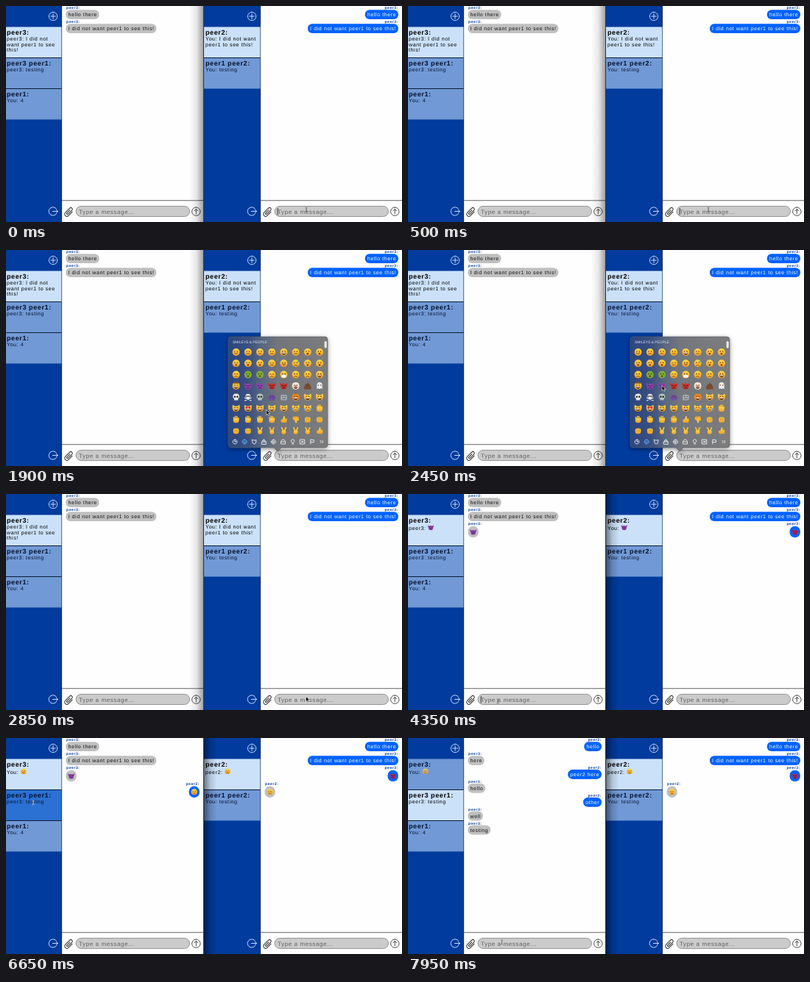
Animation of 538x294 px, one loop 8 s. Source, as an HTML page:

```html
<!DOCTYPE html>
<html lang="en">
<head>
<meta charset="utf-8">
<title>Two chat windows</title>
<style>
html, body { margin: 0; width: 100%; height: 100%; overflow: hidden; background: #fff; }
svg { display: block; width: 100vw; height: 100vh; }
text { font-family: "Liberation Sans", Arial, sans-serif; letter-spacing: .6px; text-rendering: geometricPrecision; white-space: pre; }
.title { font-size: 9px; font-weight: bold; }
.sub, .msg { font-size: 7px; }
.name { font-size: 5px; font-weight: bold; fill: #003a9a; }
.hint { font-size: 8px; fill: #606060; }
.head { font-size: 4.9px; letter-spacing: 0; fill: #e3e8f0; }
.line { fill: none; stroke-linecap: round; stroke-linejoin: round; }
</style>
</head>
<body>
<svg id="stage" viewBox="0 0 538 294" preserveAspectRatio="none"></svg>
<script>
const LOOP = 8000;
const A = 'peer1', B = 'peer2', C = 'peer3';
const SECRET = `I did not want ${A} to see this!`;

// Moments of the story, in ms
const T = {
  open: 600, close: 2450, typed: 3000, sent: 3450,
  swap: 4250, open2: 4700, close2: 5550, sent2: 6000,
  hover: 6400, group: 6900
};

const pen = document.createElement('canvas').getContext('2d');
pen.font = '7px "Liberation Sans", Arial, sans-serif';
const textWidth = s => pen.measureText(s).width + s.length * .6;

const at = (x, y, body, scale = 1) => `<g transform="translate(${x} ${y}) scale(${scale})">${body}</g>`;
const rect = (x, y, w, h, fill, rx = 0) => `<rect x="${x}" y="${y}" width="${w}" height="${h}" rx="${rx}" fill="${fill}"/>`;
const disc = (x, y, r, fill) => `<circle cx="${x}" cy="${y}" r="${r}" fill="${fill}"/>`;
const shape = (d, fill) => `<path d="${d}" fill="${fill}"/>`;
const stroke = (d, color, w = 1) => `<path class="line" d="${d}" stroke="${color}" stroke-width="${w}"/>`;
const text = (cls, x, y, s, extra = '') => `<text class="${cls}" x="${x}" y="${y}" ${extra}>${s.replace('&', '&amp;')}</text>`;
const during = (from, to, body) => `<g data-from="${from}" data-to="${to}">${body}</g>`;

// ---- Emoji -------------------------------------------------------------
const INK = '#6b3a10';
const eyes = {
  dot: disc(-1.8, -1, .8, INK) + disc(1.8, -1, .8, INK),
  arc: stroke('M-2.9-.6q1-1.3 2 0M.9-.6q1-1.3 2 0', INK, .8),
  heart: disc(-2, -1.2, 1.6, '#e2283a') + disc(2, -1.2, 1.6, '#e2283a'),
  shade: rect(-4.2, -2.2, 3.8, 2.6, '#222', 1) + rect(.4, -2.2, 3.8, 2.6, '#222', 1)
};
const mouths = {
  grin: shape('M-3 .8h6q-.4 3.2-3 3.2t-3-3.2z', INK) + rect(-2.4, .8, 4.8, 1, '#fff'),
  smile: stroke('M-2.4 1.4q2.4 2.2 4.8 0', INK, .8),
  frown: stroke('M-2 3q2-1.8 4 0', INK, .8),
  flat: stroke('M-1.9 2.2h3.8', INK, .8),
  oh: disc(0, 2.3, 1.3, INK),
  kiss: disc(.3, 2, .7, INK) + disc(3.4, 2.6, 1.3, '#e2283a'),
  tongue: stroke('M-2.4 1h4.8', INK, .8) + rect(-1.2, 1, 2.4, 2.8, '#e8506a', 1.1),
  mask: rect(-3.4, .4, 6.8, 3.8, '#eef3f7', 1.4)
};
const extras = {
  sweat: disc(3.6, -2.6, 1.2, '#4aa8ee'),
  tears: disc(-3.8, 1.2, 1.2, '#4aa8ee') + disc(3.8, 1.2, 1.2, '#4aa8ee'),
  halo: '<ellipse cy="-4.4" rx="3.4" ry="1.1" fill="none" stroke="#4ab4ee"/>',
  hat: shape('M-5.4-2.4q5.4-2 10.8 0l-2-.8-1-2.4h-4.8l-1 2.4z', '#8a5422')
};
const face = (eye, mouth, extra, skin = 'url(#sun)') =>
  disc(0, 0, 5.2, skin) + eyes[eye] + mouths[mouth] + (extras[extra] || '');
const imp = (skin, ink = '#3d124e') =>
  shape('M-5-5q.4 2.4 2 2.6q3-1.6 6 0q1.6-.2 2-2.6q1.2 3-.6 5.2q.4 4.9-4.4 4.9t-4.4-4.9q-1.8-2.2-.6-5.2z', skin) +
  stroke('M-3-.8l2 1M3-.8l-2 1M-1.8 3.2q1.8-1.6 3.6 0', ink, .9);
const skull = skin => shape('M0-5q4.6 0 4.6 4.4q0 2-1.8 2.8v2.4h-5.6v-2.4q-1.8-.8-1.8-2.8q0-4.4 4.6-4.4z', skin) +
  disc(-1.8, -.4, 1.3, '#222') + disc(1.8, -.4, 1.3, '#222');
const cat = (eye, mouth, extra) =>
  shape('M-4.8-5l3 1.8h3.6l3-1.8q.8 4 .2 6q-1 3.6-5 3.6t-5-3.6q-.6-2 .2-6z', 'url(#sun)') + eyes[eye] + mouths[mouth] + (extras[extra] || '');
const thumb = shape('M-4 0l2.4-.6 1.6-4.4q2 0 1.6 3.6h2.6q1 3.2-.6 5.8h-5.2l-2.4-.8z', 'url(#sun)');
const fist = rect(-4, -3.4, 8, 7.6, 'url(#sun)', 2.4) + stroke('M-2-2.6v3M0-2.6v3M2-2.6v3', '#b87414', .6);
const palm = stroke('M-3.2-1v-2M-1-1v-3.6M1.2-1v-3.4M3.4 0v-2', '#fbc02d', 1.7) + rect(-4, -2, 8, 6.6, 'url(#sun)', 2.6);
const victory = stroke('M-1 0l-1.8-4.4M1 0l1.8-4.4', '#fbc02d', 1.9) + rect(-3, -1, 6, 5.8, 'url(#sun)', 2.2);
const heart = shape('M0 4.8q-8-5-4.4-8.4q2.6-2 4.4 1q1.8-3 4.4-1q3.6 3.4-4.4 8.4z', '#e5263a');

const glyphs = {
  a: face('dot', 'grin'), b: face('arc', 'grin'), c: face('arc', 'grin', 'sweat'),
  d: face('arc', 'grin', 'tears'), e: face('dot', 'smile'), f: face('arc', 'smile'),
  g: face('heart', 'grin'), h: face('arc', 'kiss'), i: face('dot', 'tongue'),
  j: face('shade', 'smile'), k: face('arc', 'flat'), l: face('arc', 'frown'),
  m: face('dot', 'frown'), n: face('dot', 'frown', 'sweat'), o: face('dot', 'oh'),
  p: face('dot', 'flat'), q: face('arc', 'smile', 'halo'), r: face('dot', 'frown', '', '#ee6a3c'),
  s: face('dot', 'frown', 'tears'), u: face('dot', 'grin', '', '#58aef0'),
  v: face('dot', 'oh', '', '#7fae2e'), x: face('dot', 'mask'), y: face('dot', 'grin', 'hat'),
  P: imp('#8e45a8'), R: imp('#c8312c', '#3c0a08'), W: face('dot', 'grin', '', '#f2e6dd') + disc(0, .4, 1.2, '#e5263a'),
  D: shape('M0-5q2 1 1.6 2.6q2.6.4 2 2.6q2.4 1 1 4.6h-9.2q-1.4-3.6 1-4.6q-.6-2.2 2-2.6q1.6-.6 1.6-2.6z', '#7a4a2c') + eyes.dot,
  G: shape('M-3.8 4.6v-5.6q0-4 3.8-4t3.8 4v5.6l-2-1.2-1.8 1.2-1.8-1.2z', '#eceef2') + eyes.dot,
  S: skull('#ecebe8'), Y: stroke('M-4.4 1l8.8 4M4.4 1l-8.8 4', '#ecebe8', 1.3) + at(0, -1, skull('#ecebe8'), .75), A: skull('#b4c4b6'),
  I: shape('M-5-1h2v-2h6v2h2v4h-2v2h-2v-2h-2v2h-2v-2h-2z', '#6c48a4') + eyes.dot,
  B: rect(-4.4, -3.4, 8.8, 8, '#9fb0bb', 1.6) + eyes.dot + mouths.flat,
  J: face('dot', 'grin', '', '#ef8420') + rect(-.7, -6, 1.4, 2, '#4b7c26'),
  C: cat('dot', 'grin'), Z: cat('heart', 'grin'), '-': cat('dot', 'frown', 'tears'),
  T: palm, K: thumb, N: `<g transform="scale(1 -1)">${thumb}</g>`, F: fist, V: victory,
  1: shape('M-.6-5.4q4.8 3 4.6 7q-.4 3.8-4 3.8t-4-3.8q0-2 1.4-3.4l1 1.4q1.6-2 1-5z', '#f0641e') + shape('M0 .4q2.4 1.6 2 3q-.6 1.6-2 1.6t-2-1.6q-.2-1.4 2-3z', '#ffd23c'),
  2: rect(-1.4, -5, 2.8, 10, '#d2252f', 1.2),
  3: rect(-4, -4.6, 8, 9.4, '#4c5663', 1) + stroke('M-2-2h4M-2 0h4M-2 2h4', '#a4b0bd', .7),
  4: shape('M-4-4h8l-3 5v4h-2v-4z', '#e3e3dc'), 5: stroke('M-4.4-3v3M-2.4-3h1.6v3h-1.6zM1.6-3h1.6v3h-1.6zM-4 3.4h8M-3 5h6', '#dc2638', .9),
  6: stroke('M-4-4l8 8', '#2b2b2b', 1.2), 7: shape('M-4 3l1-8 3 .6-.6 4q4-3 5.2 1q.6 3-3.2 4z', 'url(#sun)'),
  8: shape('M-5 4q2-9 7-7q3 2 1 3q-3-1-2 2l4 2z', '#2f6cae'),
  9: rect(-4.4, -4.6, 8.8, 8.6, '#31363d', 2) + rect(-3.2, -3, 6.4, 3, '#aebdca') + disc(-2.4, 2, .8, '#f2d04a') + disc(2.4, 2, .8, '#f2d04a'),
  t: rect(-2, -5, 4, 10, '#2f4a6d') + stroke('M0-4v8', '#78a0cc', .8),
  w: disc(-1.4, -2, 2.8, '#fbc02d') + rect(-4.4, -1.4, 9.4, 4.4, '#e6edf4', 2.2) + stroke('M-2 4.2v.6M1 4.2v.6', '#4aa8ee', 1),
  z: rect(-2.8, -5, 5.6, 10, '#16181c', 1) + rect(-1.8, -3.6, 3.6, 6.4, '#59616b'),
  E: stroke('M-4-2v-2h2M2-4h2v2M4 2v2h-2M-2 4h-2v-2', '#56565a', 1),
  H: stroke('M0 1v-5', '#fbc02d', 2) + at(0, 2.2, fist, .7),
  L: rect(-5, -4.6, 10, 9.2, '#dc2430', 1.6) + stroke('M-3.6 2.4l1.5-5 1.5 5M.8-2.6v5h1.6q1.6-2.4 0-2.6q1-2.4-1.6-2.4', '#fff', .9),
  M: disc(0, 0, 5.2, '#1673e8') + stroke('M-2.4 2.4v-5l2.4 3.4 2.4-3.4v5', '#fff', 1.2),
  X: stroke('M-4-4l8 8M4-4l-8 8', '#e11f2c', 2.4), O: '<ellipse rx="5.2" ry="4" fill="#eef1f5"/>' + shape('M1 3l3 2-.6-3z', '#eef1f5') + stroke('M-2 0h.1M0 0h.1M2 0h.1', '#888', 1),
  Q: heart, U: rect(-5, -5, 10, 10, '#4c9bd8', 1.6) + stroke('M0 3v-6M-2.4-.8l2.4-2.4 2.4 2.4', '#fff', 1.3)
};

const recent = ['12345678', '9twzESHL', 'MXOVQU'];
const people = ['aabbbcdd', 'ffqeeefg', 'ghhhhiii', 'iippjjgb', 'plllmmmm', 'lllmsssl', 'mrromruo', 'nnnlabee',
  'epppapoo', 'oookinoo', 'mvvlxmma', 'yPPRRWDG', 'SYAIBJCC', 'CZCCC--T', 'TTTTKNFF', 'FFVVVVVK'];
const PITCH = 15.3;
const grid = (rows, top) => rows.map((row, r) =>
  [...row].map((code, c) => at(312.6 + 16.2 * c, top + PITCH * r, glyphs[code], .96)).join('')).join('');

// ---- Emoji picker ------------------------------------------------------
const tabs = ['M0-3a3 3 0 1 0 .1 0M0-2v2h1.6', 'M0-3a3 3 0 1 0 .1 0M-1.5.6q1.5 2 3 0M-1-1v.1M1-1v.1',
  'M-2.6-3l1 1h3.2l1-1v3q-.4 3-2.6 3t-2.6-3z', 'M-3 3v-3h6v3zM-1.6 0v-2h3.2v2M0-2v-1.4', 'M0-3a3 3 0 1 0 .1 0M-1-1l2 .2 0 1.8-2 .2z',
  'M-3 2.6v-3l2-2.6h2l2 2.6v3zM-2 0h4', 'M-1 3h2M-1 1.4q-2.6-2.4-.6-4q1.6-1 3.2 0q2 1.6-.6 4z', 'M-3-3h6v6h-6zM-1.4-1l2.8 2M1.4-1l-2.8 2', 'M-2 3v-6l4.6.6v3h-4.6', 'M-2-1.6l1.6 1.6-1.6 1.6M.6-1.6l1.6 1.6-1.6 1.6'];
const picker = (id, dx) => `<g id="${id}" transform="translate(${dx} 0)">
  <path d="M306 118h127q4 0 4 4v143q0 4-4 4h-59l-5 5-5-5h-58q-4 0-4-4v-143q0-4 4-4z" fill="url(#glass)" stroke="#55585e" stroke-width=".6" filter="url(#lift)"/>
  <g clip-path="url(#list)"><g class="rows">${grid(recent, 139)}${grid(people, 195)}</g></g>
  <g clip-path="url(#panel)">${text('head recent', 308, 0, 'FREQUENTLY USED')}${text('head people', 308, 0, 'SMILEYS & PEOPLE')}</g>
  <rect class="thumb" x="432.6" width="3.2" height="9.5" rx="1.6" fill="#e8e8e8"/>
  ${tabs.map((d, i) => at(311 + 13.1 * i, 261, `<g class="tab">${stroke(d, 'currentColor', 1)}</g>`)).join('')}
</g>`;

// ---- Chat windows ------------------------------------------------------
const ring = (x, y, color, d) => at(x, y, stroke('M0-5.7a5.7 5.7 0 1 0 .01 0' + d, color, .9));
const frame = x => rect(x - (x ? 1 : 0), 0, x ? 77 : 76, 294, '#003b9d') + rect(x + 76, 0, 192, 294, '#fefefe') +
  rect(x + 75.3, 0, .8, 294, '#26344e') + rect(x + 76, 264.3, 192, .9, '#555') +
  ring(x + 64, 14, '#dce8ff', 'M0-3.4v6.8M-3.4 0h6.8') +
  at(x + 64, 279.5, stroke('M4.6-3.2a5.7 5.7 0 1 0 0 6.4M-.6 0h7M4.4-2l2 2-2 2', '#dce8ff', .9)) +
  at(x + 85.5, 280.5, `<g transform="rotate(45)">${stroke('M2.6-3v6.4a2.6 2.6 0 0 1-5.2 0v-7.4a1.8 1.8 0 0 1 3.6 0v6.6a.8.8 0 0 1-1.8 0v-5', '#333', .9)}</g>`, 1.15) +
  `<rect x="${x + 95}" y="272.5" width="154.5" height="14" rx="7" fill="#cbcbcb" stroke="#8b8b8b" stroke-width=".9"/>` +
  ring(x + 258.3, 279.7, '#333', 'M0 3.2v-6.4M-2.5-.8l2.5-2.5 2.5 2.5');

const SHADES = { on: '#cbe1f9', off: '#7199d5', hover: '#2b70d3' };
const item = (x, row, title, lines, mode = 'off', glyph) => {
  const y = 29 + 42 * row, ink = mode === 'on' ? '#000' : '#04122e';
  const left = x - (x ? 1 : 0), width = x + 75.4 - left;
  const subY = y + (glyph ? 20.4 : 18);
  const emoji = glyph ? at(x + 5 + textWidth(lines[0] + ' '), y + 16.4, `<g opacity="${mode === 'on' ? 1 : .75}">${glyphs[glyph]}</g>`, .74) : '';
  return rect(left, y - .5, width, 42, SHADES[mode]) + (row ? rect(left, y - 1, width, 1, '#0d1c38') : '') +
    `<g fill="${ink}">${text('title', x + 1, y + 10.2, title)}` +
    lines.map((s, i) => text('sub', x + 1, subY + 7.6 * i, s)).join('') + `</g>${emoji}`;
};

const label = (x, y, who, mine) => text('name', x + (mine ? 263 : 82), y, who + ':', mine ? 'text-anchor="end"' : '');
const bubble = (x, row, who, body, mine) => {
  const y = 5.3 + 18.9 * row, w = textWidth(body) + 6, left = mine ? x + 263 - w : x + 81.3;
  return label(x, y - 1.1, who, mine) + rect(left, y, w, 12.8, mine ? '#0062ff' : '#c0c0c0', 6.2) +
    text('msg', left + 3.2, y + 8.8, body, `fill="${mine ? '#fff' : '#111'}"`);
};
const sticker = (x, y, who, glyph, mine) => {
  const cx = x + (mine ? 255.7 : 88.6);
  return label(x, y - 9.2, who, mine) + rect(cx - 7.2, y - 7.8, 14.4, 15.6, mine ? '#0062ff' : '#c0c0c0', 7.2) + at(cx, y, glyph, .8);
};
const field = (x, from, to, glyph) => {
  const hint = text('hint', x + 99, 282.8, 'Type a message...');
  return during(0, from, hint) + during(from, to, at(x + 104, 279.5, glyphs[glyph], .85)) + during(to, LOOP, hint);
};
const caret = x => rect(x + 98.7, 275, .9, 9.4, '#222');

const leftWindow = frame(0) +
  during(0, T.sent, item(0, 0, C + ':', [C + ': I did not', `want ${A} to see`, 'this!'], 'on')) +
  during(T.sent, T.sent2, item(0, 0, C + ':', [C + ':'], 'on', 'P')) +
  during(T.sent2, T.group, item(0, 0, C + ':', ['You:'], 'on', 'l')) +
  during(T.group, LOOP, item(0, 0, C + ':', ['You:'], 'off', 'l')) +
  [[0, T.hover, 'off'], [T.hover, T.group, 'hover'], [T.group, LOOP, 'on']].map(([a, b, mode]) =>
    during(a, b, item(0, 1, `${C} ${A}:`, [C + ': testing'], mode))).join('') +
  item(0, 2, A + ':', ['You: 4']) +
  during(0, T.group, bubble(0, 0, C, 'hello there') + bubble(0, 1, C, SECRET)) +
  during(T.sent, T.group, sticker(0, 51.5, C, glyphs.P)) +
  during(T.sent2, T.group, sticker(0, 73.4, B, glyphs.l, true)) +
  during(T.group, LOOP, [[B, 'hello'], [C, 'here'], [B, B + ' here'], [A, 'hello'], [B, 'other'], [C, 'well'], [C, 'testing']]
    .map(([who, body], i) => bubble(0, i, who, body, who === B)).join('')) +
  field(0, T.close2, T.sent2, 'l') + during(T.swap, T.open2 + 100, caret(0));

const rightWindow = frame(270) +
  during(0, T.sent, item(270, 0, B + ':', ['You: I did not want', `${A} to see this!`], 'on')) +
  during(T.sent, T.sent2, item(270, 0, B + ':', ['You:'], 'on', 'P')) +
  during(T.sent2, LOOP, item(270, 0, B + ':', [B + ':'], 'on', 'l')) +
  item(270, 1, `${A} ${B}:`, ['You: testing']) +
  bubble(270, 0, C, 'hello there', true) + bubble(270, 1, C, SECRET, true) +
  during(T.sent, LOOP, sticker(270, 51.5, C, imp('#a52a58'), true)) +
  during(T.sent2, LOOP, sticker(270, 73.4, B, glyphs.l)) +
  field(270, T.typed, T.sent, 'P') + during(0, 1600, caret(270));

const shadow = (id, ...alphas) => `<linearGradient id="${id}">${alphas.map((a, i) =>
  `<stop offset="${i / (alphas.length - 1)}" stop-opacity="${a}"/>`).join('')}</linearGradient>`;
const stage = document.getElementById('stage');
stage.innerHTML = `<defs>
  <linearGradient id="sun" x2="0" y2="1"><stop stop-color="#ffd84a"/><stop offset="1" stop-color="#f2a01e"/></linearGradient>
  ${shadow('shadeLeft', 0, .09, .38)}${shadow('shadeRight', .5, .14, 0)}
  <linearGradient id="glass"><stop stop-color="#2c4781"/><stop offset=".2" stop-color="#3a5080"/><stop offset=".34" stop-color="#586680"/><stop offset=".5" stop-color="#72767c"/><stop offset="1" stop-color="#7b7b7b"/></linearGradient>
  <filter id="lift" x="-15%" y="-15%" width="130%" height="130%"><feDropShadow dx="0" dy="2" stdDeviation="3" flood-opacity=".4"/></filter>
  <clipPath id="list"><rect x="302" y="129" width="130" height="124"/></clipPath>
  <clipPath id="panel"><rect x="302" y="119" width="130" height="134"/></clipPath>
</defs>
${leftWindow}${rightWindow}
${rect(268, 0, .9, 294, '#222')}
${during(0, T.swap, rect(249, 0, 19.4, 294, 'url(#shadeLeft)'))}
${during(T.swap, LOOP, rect(268.5, 0, 18, 294, 'url(#shadeRight)'))}
${picker('pickRight', 0)}${picker('pickLeft', -270)}
<g id="mouse"><path id="arrow" d="M0-.5v7l1.7-1.5 1.2 2.5 1.2-.6-1.1-2.4h2.2z" fill="#000" stroke="#fff" stroke-width=".6"/>
<path id="beam" class="line" d="M-1.2-3q1.2 0 1.2 1v4q0 1-1.2 1M1.2-3q-1.2 0-1.2 1v4q0 1 1.2 1" stroke-width=".5"/></g>`;

// ---- Motion ------------------------------------------------------------
const clamp = v => Math.min(1, Math.max(0, v));
const ease = v => v * v * (3 - 2 * v);
const ramp = (t, a, b) => ease(clamp((t - a) / (b - a)));
const path = [[0, 408, 277], [500, 408, 277], [1050, 353.5, 218], [1950, 353.5, 218], [2200, 345, 185],
  [2450, 345, 185], [2750, 407.5, 276], [3550, 407.5, 276], [4200, 122, 282], [4850, 122, 282],
  [5200, 91, 216], [6000, 91, 216], [6500, 37, 88], [6950, 37, 88], [7600, 127.5, 278], [LOOP, 127.5, 278]];
const mouseAt = t => {
  const i = path.findIndex(p => p[0] > t), [a, x, y] = path[i - 1], [b, x2, y2] = path[i];
  const k = ramp(t, a, b);
  return [x + (x2 - x) * k, y + (y2 - y) * k];
};
const beamTimes = [[0, 550], [4150, 4750], [6400, 7000], [7450, LOOP]];

const byId = id => document.getElementById(id);
const timed = [...stage.querySelectorAll('[data-from]')];
const show = (el, on) => { el.style.display = on ? '' : 'none'; };

function drawPicker(id, t, open, close, scroll) {
  const el = byId(id), alpha = Math.min(clamp((t - open) / 120), clamp((close + 100 - t) / 100));
  show(el, alpha > 0);
  if (!alpha) return;
  const part = name => el.querySelector('.' + name);
  const headY = Math.max(126.8, 185.7 - scroll);
  el.style.opacity = alpha;
  part('rows').setAttribute('transform', `translate(0 ${-scroll})`);
  part('people').setAttribute('y', headY);
  part('recent').setAttribute('y', Math.min(126.8, headY - 9));
  part('thumb').setAttribute('y', 120.8 + scroll * .018);
  const active = scroll > 52 ? 1 : 0;
  el.querySelectorAll('.tab').forEach((tab, i) => { tab.style.color = i === active ? '#5cb2ff' : '#e6e6e6'; });
}

function draw(now) {
  const t = now % LOOP;
  for (const el of timed) show(el, t >= +el.dataset.from && t < +el.dataset.to);
  drawPicker('pickRight', t, T.open, T.close, 7 * ramp(t, 1050, 1190) + 171.4 * ramp(t, 1220, 1850));
  drawPicker('pickLeft', t, T.open2, T.close2, 40 * ramp(t, 4950, 5200));
  const [x, y] = mouseAt(t), beam = beamTimes.some(([a, b]) => t >= a && t < b);
  byId('mouse').setAttribute('transform', `translate(${x} ${y})`);
  byId('beam').setAttribute('stroke', t >= T.hover && t < 7000 ? '#f0e6c4' : '#444');
  show(byId('beam'), beam);
  show(byId('arrow'), !beam);
  requestAnimationFrame(draw);
}
draw(0);
</script>
</body>
</html>
```
